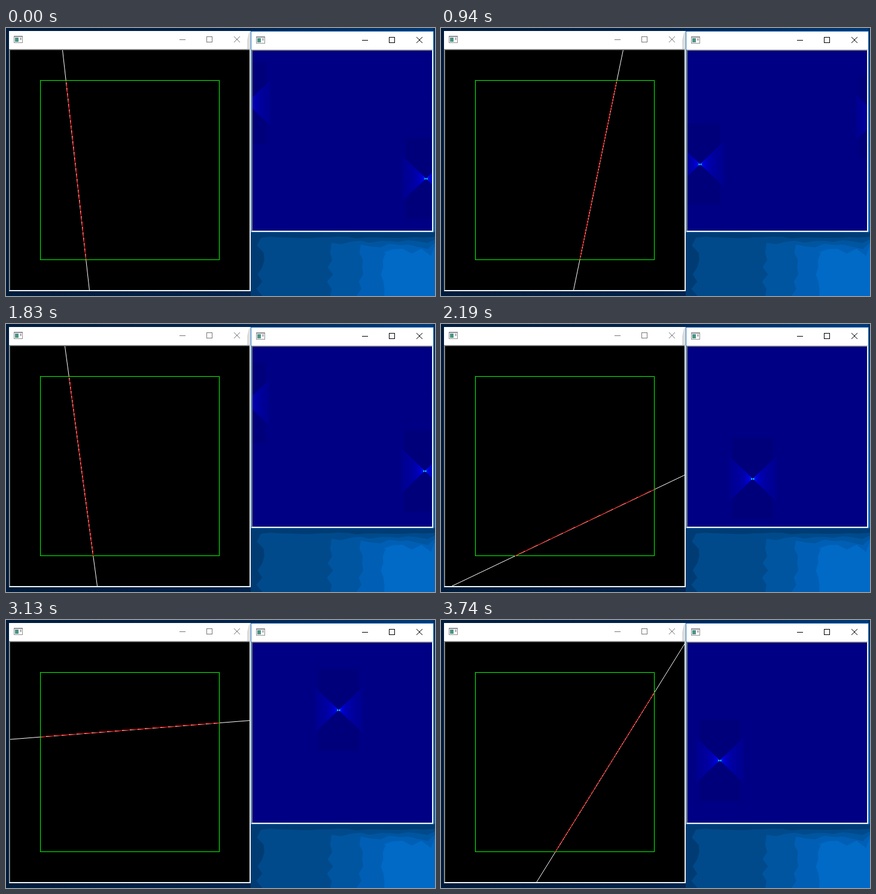
An HTML page with a canvas for the animation above (3.77 s loop, 717 by 447 pixels).

```html
<!DOCTYPE html>
<html lang="en">
<head>
<meta charset="utf-8">
<style>
  html, body { margin: 0; width: 717px; height: 447px; overflow: hidden; background: #001a38; }
  canvas { display: block; }
</style>
</head>
<body>
<canvas id="stage" width="717" height="447"></canvas>
<script>
const ctx = document.getElementById('stage').getContext('2d');
const LOOP = 3770, STEP = 42.5, RAD = Math.PI / 180;
const CX = 206.5, CY = 236.5, SWING = 100;

// the line turns while its offset swings: time in ms, angle and swing phase in degrees
const keys = [
  [0, 83.6, 26.5],
  [490, 199.8, 244.7],
  [1360, 363.6, 588.8],
  [1830, 442.3, 756.1],
  [2550, 595.8, 1050.3],
  [3130, 715.5, 1317.7],
  [3740, 841.9, 1571.1]
];

const noise = seed => {
  const v = Math.sin(seed * 12.9898) * 43758.5453;
  return v - Math.floor(v);
};

function rect(color, x, y, w, h) {
  ctx.fillStyle = color;
  ctx.fillRect(x, y, w, h);
}

function poly(color, ...points) {
  ctx.fillStyle = color;
  ctx.beginPath();
  for (let i = 0; i < points.length; i += 2) ctx.lineTo(points[i], points[i + 1]);
  ctx.fill();
}

function gradient(x0, y0, x1, y1, ...colors) {
  const g = ctx.createLinearGradient(x0, y0, x1, y1);
  colors.forEach((c, i) => g.addColorStop(i / (colors.length - 1), c));
  return g;
}

// banded glow of the wallpaper: each band has a ragged left and top edge
function desktop() {
  rect(gradient(0, 0, 717, 0, '#001c3c', '#00224a', '#003a78'), 0, 0, 717, 447);
  rect(gradient(0, 0, 0, 447, '#002a5c', '#0050a4', '#0070d0'), 714, 0, 3, 447);
  rect('#003c73', 409, 340, 308, 107);
  ['#004a8c', '#0055a0', '#005fb4', '#006ac6'].forEach((color, band) => {
    const left = 418 + 118 * Math.sqrt(band), top = 348 + 5 * band;
    const edge = [717, 447];
    for (let y = 447; y > top + 10; y -= 12) edge.push(left + 14 * noise(y + band), y);
    for (let x = left + 8; x < 717; x += 16) edge.push(x, top + (3 + 5 * band) * noise(x));
    poly(color, ...edge, 717, top);
  });
}

function windowFrame(x, y, w, h, ink) {
  const right = x + w, mid = y + 14;
  rect('#fff', x, y, w, h);
  rect('#a0a0a0', x, y + 30, w - 1, h - 31);
  rect('#e3e3e3', x + 1, y + 31, w - 2, h - 32);
  rect('#696969', x + 1, y + 31, w - 3, h - 33);

  // generic application icon
  rect('#909090', x + 8, y + 8, 15, 12);
  rect('#fff', x + 9, y + 10, 13, 9);
  rect(gradient(0, y + 10, 0, y + 18, '#4a8a9c', '#4c9a78'), x + 10, y + 11, 6, 7);
  rect('#b8b8b8', x + 18, y + 11, 3, 4);

  ctx.strokeStyle = ink;
  ctx.lineWidth = 1;
  rect(ink, right - 119, mid, 10, 1);
  ctx.strokeRect(right - 73.5, mid - 4.5, 9, 9);
  ctx.beginPath();
  ctx.moveTo(right - 28, mid - 5);
  ctx.lineTo(right - 18, mid + 5);
  ctx.moveTo(right - 18, mid - 5);
  ctx.lineTo(right - 28, mid + 5);
  ctx.stroke();
}

function clipTo(x, y, w, h, paint) {
  ctx.save();
  ctx.beginPath();
  ctx.rect(x, y, w, h);
  ctx.clip();
  paint();
  ctx.restore();
}

function smoothLine(angle, rho) {
  const c = Math.cos(angle * RAD), s = Math.sin(angle * RAD);
  const x = CX + 0.5 - s * rho, y = CY + 0.5 + c * rho;
  ctx.strokeStyle = '#fff';
  ctx.beginPath();
  ctx.moveTo(x - 600 * c, y - 600 * s);
  ctx.lineTo(x + 600 * c, y + 600 * s);
  ctx.stroke();
}

// one hard pixel per step along the longer axis
function pixelLine(color, angle, rho) {
  const c = Math.cos(angle * RAD), s = Math.sin(angle * RAD);
  for (let d = -230; d <= 230; d++) {
    const along = d + 0.5;
    if (Math.abs(c) > Math.abs(s)) rect(color, CX + along, Math.round(CY + (rho + s * along) / c), 1, 1);
    else rect(color, Math.round(CX + (c * along - rho) / s), CY + along, 1, 1);
  }
}

function bowTie(x, y) {
  const reach = 40, rise = 38;
  for (const side of [-1, 1]) {
    const tall = y + side * 68;
    poly('#00007b', x, y, x - 34, y + side * 33, x - 34, tall, x + 34, tall, x + 34, y + side * 33);
    const glow = gradient(x, 0, x + side * reach, 0,
      '#0040ff', '#0000dc', '#0000b8', '#0000a8', '#00009e', '#000098', '#000092', '#00008e');
    poly(glow, x, y, x + side * reach, y - rise, x + side * reach, y + rise);
  }
  rect('#0080ff', x - 3, y, 6, 1);
  rect('#20e8f0', x - 2, y - 1, 1, 3);
  rect('#20e8f0', x + 1, y - 1, 1, 3);
}

function transform(angle, rho) {
  const x = Math.round(563 + angle / 0.6);
  const drop = Math.round(rho / Math.SQRT2);
  rect('#000084', 412, 38, 300, 300);
  // the angle axis wraps round with the offset mirrored
  bowTie(x - 300, 188 - drop);
  bowTie(x + 300, 188 - drop);
  bowTie(x, 188 + drop);
}

// angle is folded into a half turn, which flips the offset on odd folds
function pose(t) {
  const i = keys.findLastIndex(key => key[0] <= t);
  const from = keys[i], to = keys[i + 1] || from;
  const span = to[0] - from[0];
  const steps = Math.max(1, Math.round(span / STEP));
  const part = span && Math.floor((t - from[0]) / span * steps) / steps;
  const mix = k => from[k] + (to[k] - from[k]) * part;
  const turns = Math.round(mix(1) / 180);
  const rho = SWING * Math.cos(mix(2) * RAD);
  return { angle: mix(1) - 180 * turns, rho: turns % 2 ? -rho : rho };
}

function draw(now) {
  const { angle, rho } = pose(now % LOOP);
  desktop();
  windowFrame(5, 5, 404, 434, '#777');
  poly('#dcdcdc', 409, 5, 406, 8, 403, 20, 403, 35, 409, 35);
  rect('#1874c0', 409, 5, 306, 336);
  windowFrame(410, 6, 304, 334, '#000');

  rect('#000', 7, 37, 400, 400);
  clipTo(7, 37, 400, 400, () => smoothLine(angle, rho));
  ctx.strokeStyle = '#0f0';
  ctx.strokeRect(57.5, 87.5, 299, 299);
  clipTo(58, 88, 299, 299, () => pixelLine('#f00', angle, rho - 0.4));

  clipTo(412, 38, 300, 300, () => transform(angle, rho));
  requestAnimationFrame(draw);
}
requestAnimationFrame(draw);
</script>
</body>
</html>
```
